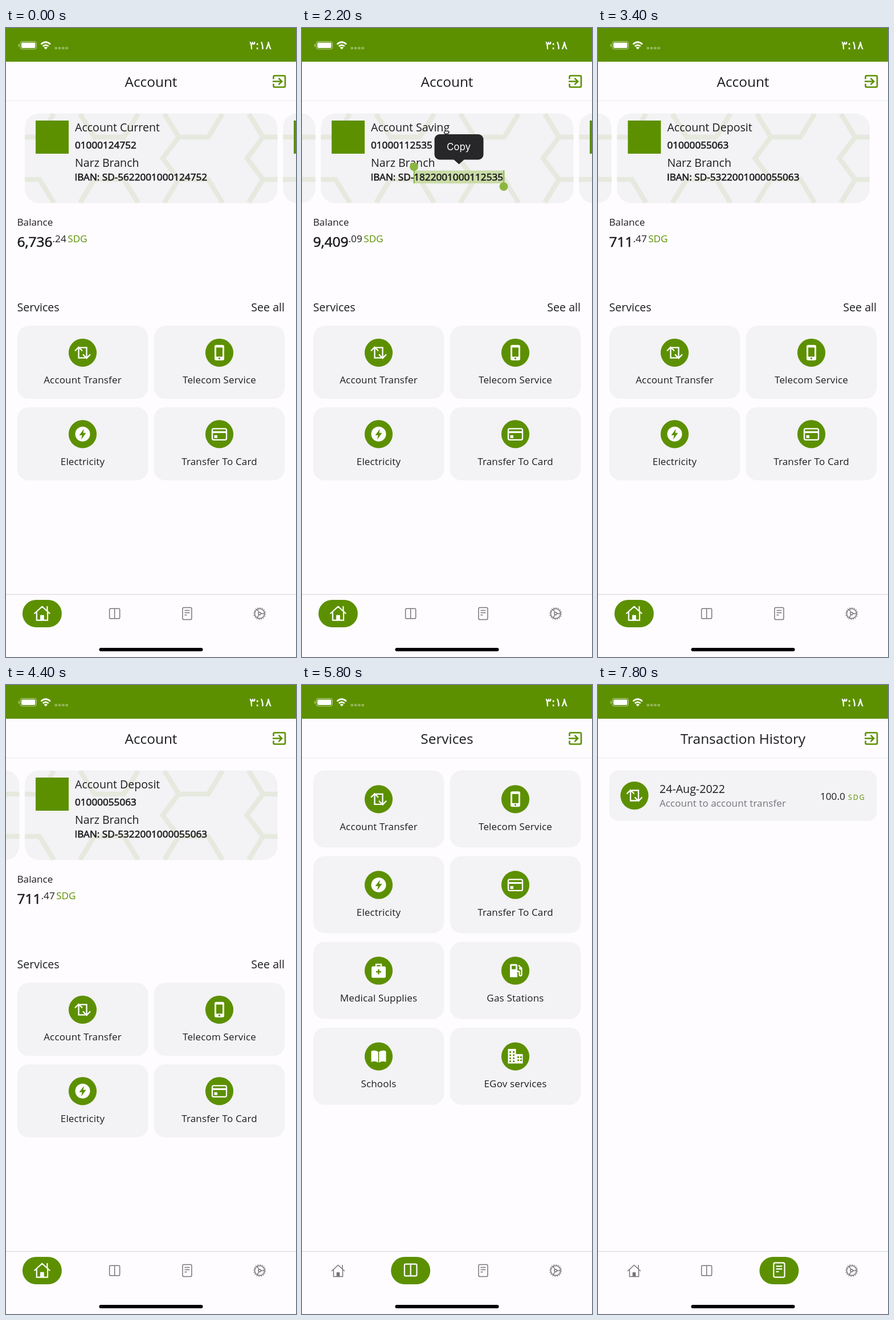
An HTML page for the animation above (8000 ms loop, 509 by 1101 pixels).

```html
<!DOCTYPE html>
<html lang="en">
<head>
<meta charset="utf-8">
<title>Banking app</title>
<style>
  html, body { margin: 0; width: 100%; height: 100%; overflow: hidden; background: #fefcff; }
  svg { display: block; width: 100%; height: 100%; }
  text { font: 17px "Open Sans", "Noto Sans", sans-serif; fill: #1d1c1e; white-space: pre; }
  .title { font-size: 24.4px; }
  .large { font-size: 19.6px; }
  .small { font-size: 17.15px; }
  .label { letter-spacing: .17px; }
  .bold { stroke: #1d1c1e; stroke-width: .65px; }
  .amount { font-size: 24.5px; }
  .green { fill: #5c9000; stroke: none; }
  .line { fill: none; stroke: currentColor; stroke-width: 2.3; }
</style>
</head>
<body>
<svg viewBox="0 0 509 1101" id="stage"></svg>
<script>
const GREEN = '#5c9000', PANEL = '#f3f2f5', DURATION = 8000, CARD_STEP = 453;

const accounts = [
  { name: 'Account Current', number: '01000124752', iban: 'SD-5622001000124752', whole: '6,736', cents: '.24' },
  { name: 'Account Saving', number: '01000112535', iban: 'SD-1822001000112535', whole: '9,409', cents: '.09' },
  { name: 'Account Deposit', number: '01000055063', iban: 'SD-5322001000055063', whole: '711', cents: '.47' },
];

// Icons are drawn around 0,0 in the current colour.
const arrow = '<path class="line" d="M-7-8V9H5M-13.5-3-7-9.7-.5-3"/>';
const icons = {
  transfer: `${arrow}<g transform="rotate(180)">${arrow}</g>`,
  phone: `<rect x="-8.5" y="-13.5" width="17" height="27" rx="3" fill="currentColor"/>
    <path d="M-5.5-9h11V7h-11z" fill="${GREEN}"/><circle cy="10" r="1.6" fill="${GREEN}"/>`,
  bolt: `<circle r="13" fill="currentColor"/><path d="M2.5-9-6 2h5l-1.5 7.5L6-2H1z" fill="${GREEN}"/>`,
  card: `<rect class="line" x="-12.5" y="-9.5" width="25" height="19.5" rx="2.5" stroke-width="2.6"/>
    <path d="M-12-5h24v3.2h-24zM-9 2h5.5v5H-9z" fill="currentColor"/>`,
  medical: `<path class="line" d="M-4.5-6v-5h9v5"/><rect x="-12.5" y="-7.5" width="25" height="20" rx="2.5" fill="currentColor"/>
    <path d="M0-2.5v9M-4.5 2h9" stroke="${GREEN}" stroke-width="2.4"/>`,
  fuel: `<path d="M-9.5 11.5v-21q0-2 2-2h9q2 0 2 2v21z" fill="currentColor"/><path d="M-6.5-8.5h7v6h-7z" fill="${GREEN}"/>
    <path class="line" d="M3 1h2q2 0 2 2v4q0 2 2 2t2-2V-4L5.5-9.5"/><circle cx="9" cy="-4" r="2.5" fill="currentColor"/>`,
  book: '<path d="M-.8 11Q-7 7-13 10V-9q6-3 12.2 1zM.8 11Q7 7 13 10V-9Q7-12 .8-8z" fill="currentColor"/>',
  city: `<path d="M-13-13H1v9h12v16.5h-26z" fill="currentColor"/>
    <path d="M-9-9v19M-3-9v19M5 0v10M10 0v10" stroke="${GREEN}" stroke-width="2.8" stroke-dasharray="2.8 2.6"/>`,
  home: `<path class="line" d="M-11.5 1 0-9.5 11.5 1M-8-1.5V10.5H8V-1.5M7.5-3v-7"/>
    <path d="M-2.8 11V3h5.6v8z" fill="currentColor"/>`,
  columns: '<rect class="line" x="-9" y="-8.7" width="18" height="17.4" rx="1.8"/><path class="line" d="M0-8.7V8.7"/>',
  page: '<rect class="line" x="-8" y="-10.5" width="16" height="21" rx="2.2"/><path class="line" d="M-4.5-5.5h9M-4.5-1.5h9M-4.5 2.5h4"/>',
  gear: `<circle class="line" r="8.6"/><circle class="line" r="10.2" stroke-dasharray="1.6 2.4"/>
    <circle class="line" r="2.2"/><path class="line" d="M2 0H8.6M-1.2-2-4.3-7.4M-1.2 2-4.3 7.4"/>`,
};

const text = (x, y, value, style = '', anchor = 'start') =>
  `<text x="${x}" y="${y}" class="${style}" text-anchor="${anchor}">${value}</text>`;
const panel = (x, y, w, h, r = 20) =>
  `<rect x="${x}" y="${y}" width="${w}" height="${h}" rx="${r}" fill="${PANEL}"/>`;
const badge = (x, y, icon) =>
  `<g transform="translate(${x} ${y})" color="#fff"><circle r="24.6" fill="${GREEN}"/>${icons[icon]}</g>`;

const services = [
  ['Account Transfer', 'transfer'], ['Telecom Service', 'phone'],
  ['Electricity', 'bolt'], ['Transfer To Card', 'card'],
  ['Medical Supplies', 'medical'], ['Gas Stations', 'fuel'],
  ['Schools', 'book'], ['EGov services', 'city'],
];

function tiles(count, top, height, pitch, iconY) {
  return services.slice(0, count).map(([name, icon], i) => {
    const x = 19.7 + (i % 2) * 240, y = top + (i >> 1) * pitch;
    return panel(x, y, 229.6, height) + badge(x + 114.8, y + iconY, icon)
      + text(x + 114.8, y + iconY + 54, name, 'label', 'middle');
  }).join('');
}

// Repeating half hexagons behind the card text.
const hexes = [7, 155, 303, 451].map(x =>
  `M${x - 25} 150 ${x} 191h52l25-41M${x - 25} 306 ${x} 265h52l25 41`
  + (x > 300 ? `M${x} 191l-28 37 28 37` : '')).join('');

const selection = `<g id="selection">
  <path d="M197 249.500H355V272H197z" fill="#c9dca7"/>
  <path d="M196.700 243V272M354.300 249V277" stroke="#8ab640" stroke-width="2"/>
  <circle cx="196.500" cy="242.700" r="7.400" fill="#8ab640"/><circle cx="354" cy="277.500" r="7.400" fill="#8ab640"/></g>`;
const toolbar = `<g id="toolbar"><rect x="232.500" y="186" width="86" height="44.500" rx="9" fill="#272628"/>
  <path d="M266 230 275.500 238.500 285 230z" fill="#272628"/>
  <text x="275" y="213.500" text-anchor="middle" style="font:17px Inter,sans-serif;fill:#fff">Copy</text></g>`;

function accountCard({ name, number, iban }, i) {
  const selectable = i === 1;
  return `<g transform="translate(${i * CARD_STEP} 0)">
    ${panel(33, 149.5, 443.5, 157, 25)}
    <path d="${hexes}" clip-path="url(#card)" fill="none" stroke="#e6e9de" stroke-width="8.500"/>
    <rect x="52" y="162" width="58" height="58" fill="${GREEN}"/>
    ${text(121, 181, name, 'large')}${text(121, 211, number, 'small bold')}
    ${text(121, 242.5, 'Narz Branch', 'large')}
    ${selectable ? selection : ''}${text(120.5, 267, 'IBAN: ' + iban, 'small bold')}${selectable ? toolbar : ''}</g>`;
}

const tabs = ['home', 'columns', 'page', 'gear'];
const tabBar = tabs.map((icon, i) => `<g transform="translate(${63.4 + i * 127.25} 1025)">
  <g id="idle${i}" color="#77757a" style="--w:1.5">${icons[icon].replaceAll('class="line"', 'class="line" style="stroke-width:1.5"')}</g>
  <g id="active${i}" color="#fff"><rect id="pill${i}" x="-34.500" y="-24" width="69" height="48" rx="24" fill="${GREEN}"/>
  <g transform="translate(0 -1) scale(1.2)">${icons[icon].replaceAll('class="line"', 'class="line" style="stroke-width:1.8"')}</g></g></g>`).join('');

const stage = document.getElementById('stage');
stage.innerHTML = `
  <clipPath id="card"><rect x="33" y="149.500" width="443.500" height="157" rx="25"/></clipPath>
  <rect width="509" height="1101" fill="#fefcff"/>
  <rect width="509" height="59" fill="${GREEN}"/>
  <g fill="none" stroke="#fff">
    <rect x="25" y="23.500" width="28.500" height="13.500" rx="3.500" stroke-opacity=".6"/>
    <rect x="27" y="25.500" width="24.500" height="9.500" rx="2" fill="#fff" stroke="none"/>
    <path d="M22.500 28.500v4" stroke-width="1.500" stroke-opacity=".6"/>
    <path d="M61.500 28.500q8.200-7.500 16.400 0M64.700 32q5-4.300 10 0" stroke-width="2.700"/>
    <path d="M66.500 34.200q3.200-2.600 6.400 0L69.700 37.600z" fill="#fff" stroke="none"/>
    <path d="M85.500 35.300h24" stroke-width="4" stroke-dasharray="4.500 1.800" stroke-opacity=".35"/>
  </g>
  <text x="446.500" y="37" text-anchor="middle" style="font:20px 'DejaVu Sans',sans-serif;fill:#fff;stroke:#fff;stroke-width:.5">٣:١٨</text>
  <path d="M0 127.500H509" stroke="#e9e8eb"/>
  <g fill="none" stroke="${GREEN}" stroke-width="2.600">
    <path d="M469.500 89.500V85.500q0-2 2-2H488q2 0 2 2V101.500q0 2-2 2H471.500q-2 0-2-2V97.500"/>
    <path d="M468 93.500H483.500M478.500 87.800 484.200 93.500 478.500 99.200"/>
  </g>
  <g id="page0">
    ${text(254.5, 102.5, 'Account', 'title', 'middle')}
    <g id="cards">${accounts.map(accountCard).join('')}</g>
    ${text(19.5, 346, 'Balance', 'small')}
    <text x="19.500" y="383" class="amount bold"><tspan id="whole"></tspan><tspan id="cents" class="small" dy="-8" stroke="none"></tspan><tspan class="small green" dx="2.500">SDG</tspan></text>
    ${text(19.5, 495.5, 'Services', 'large')}${text(489, 495.5, 'See all', 'large', 'end')}
    ${tiles(4, 521.3, 128, 142.5, 47)}
  </g>
  <g id="page1">${text(254.5, 102.5, 'Services', 'title', 'middle')}${tiles(8, 149.5, 135, 150.1, 50.3)}</g>
  <g id="page2">
    ${text(254.5, 102.5, 'Transaction History', 'title', 'middle')}
    ${panel(19.7, 149.5, 469.6, 88.5, 16)}${badge(64, 193.5, 'transfer')}
    ${text(108, 188.5, '24-Aug-2022', 'large')}
    <text x="108" y="213" style="fill:#77757a;letter-spacing:.1px">Account to account transfer</text>
    ${text(390, 200.5, '100.0', 'small')}
    <text x="439" y="200.500" style="font-size:12.5px;letter-spacing:1.8px;fill:${GREEN}">SDG</text>
  </g>
  <path d="M0 991.500H509" stroke="#dedde1" stroke-width="1.500"/>
  ${tabBar}
  <rect x="163.500" y="1085" width="182" height="6" rx="3"/>`;

const el = Object.fromEntries([...stage.querySelectorAll('[id]')].map(node => [node.id, node]));
el.cents.style.stroke = 'none';

const ramp = (t, start, end) => {
  const x = Math.min(1, Math.max(0, (t - start) / (end - start)));
  return x * x * (3 - 2 * x);
};
// Critically damped spring from 0 to 1.
const spring = (t, start, tau) => {
  const x = Math.max(0, t - start) / tau;
  return 1 - (1 + x) * Math.exp(-x);
};

function draw(t) {
  const position = spring(t, 720, 80) + spring(t, 2840, 60);
  el.cards.setAttribute('transform', `translate(${-position * CARD_STEP} 0)`);
  const account = accounts[Math.min(2, Math.round(position))];
  el.whole.textContent = account.whole;
  el.cents.textContent = account.cents;
  el.selection.setAttribute('opacity', t < 3300 ? ramp(t, 1720, 1850) : 0);
  el.toolbar.setAttribute('opacity', t < 2880 ? ramp(t, 2000, 2180) : 0);

  const toServices = ramp(t, 5360, 5760), toHistory = ramp(t, 6360, 6840);
  const shown = [1 - toServices, toServices * (1 - toHistory), toHistory, 0];
  shown.forEach((amount, i) => {
    if (el['page' + i]) el['page' + i].setAttribute('opacity', amount);
    el['idle' + i].setAttribute('opacity', 1 - amount);
    el['active' + i].setAttribute('opacity', amount);
    el['pill' + i].setAttribute('transform', `scale(${0.5 + amount / 2} 1)`);
  });
}

function tick(now) {
  draw(now % DURATION);
  requestAnimationFrame(tick);
}
draw(0);
requestAnimationFrame(tick);
</script>
</body>
</html>
```
